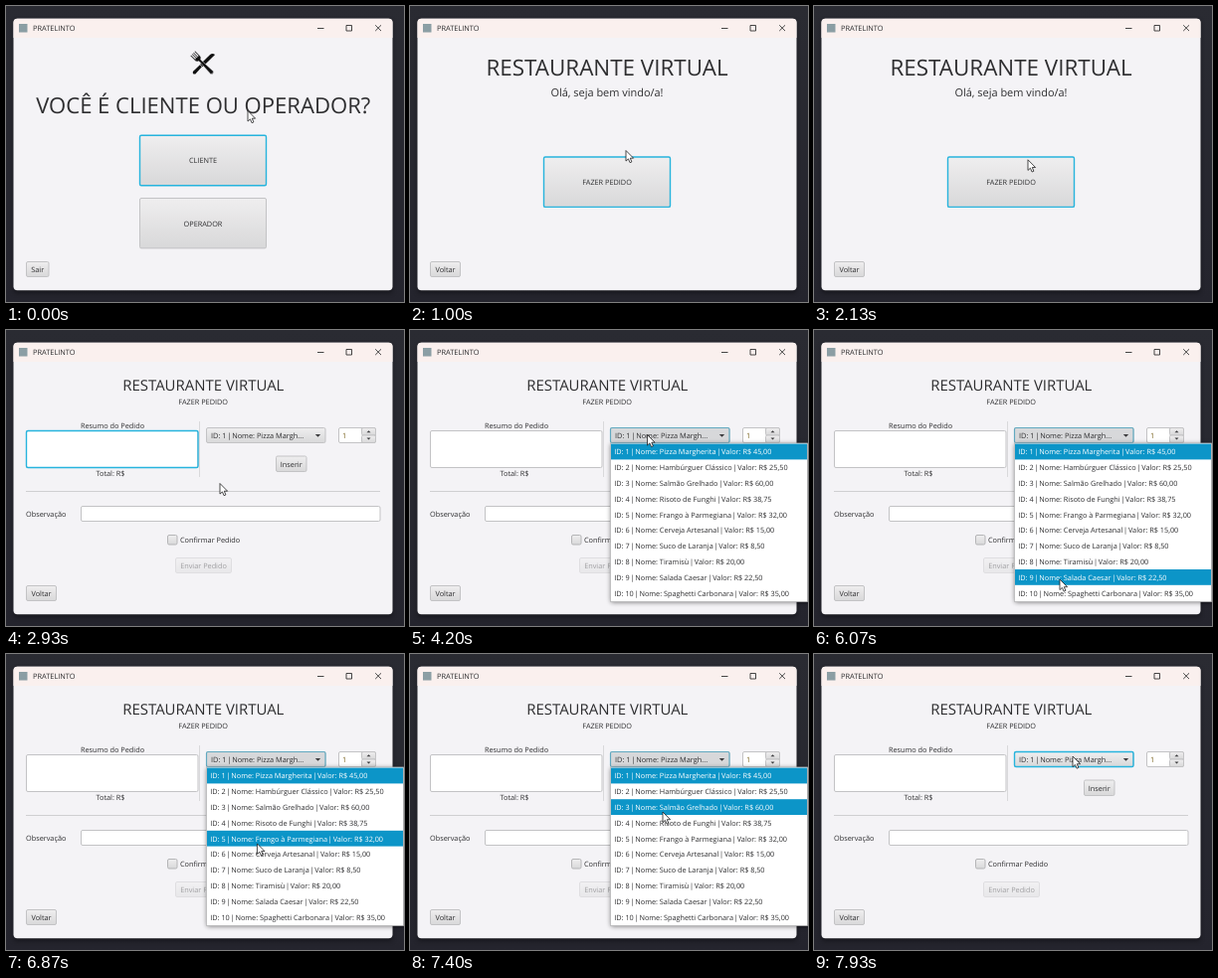
An HTML page that plays this animation: 400 px wide and 298 px high, repeating every 8000 ms.

```html
<!DOCTYPE html>
<html lang="pt-BR">
<head>
<meta charset="utf-8">
<title>Restaurante virtual</title>
<style>
html, body { margin: 0; width: 100%; height: 100%; overflow: hidden; background: #26272e; }
svg { display: block; width: 100vw; height: 100vh; }
text {
  font-family: "Open Sans", "Noto Sans", sans-serif;
  font-size: 7.3px;
  fill: #2e2e30;
  text-rendering: geometricPrecision;
  white-space: pre;
}
</style>
</head>
<body>
<svg id="stage" viewBox="0 0 400 298" xmlns="http://www.w3.org/2000/svg"></svg>
<script>
const LOOP = 8000, TICK = 1000 / 15;
const PAGE2 = 670, PAGE3 = 2200, OPEN = 4000, CLOSE = 7790;
const ROW_H = 15.8, LIST_Y = 114.6;
const FOCUS = '#27b4dd', LINE = '#c3c3c5';

// time, x, y of the pointer tip
const PATH = [
  [0, 243, 105.5], [70, 243, 105.5], [480, 217, 145.5], [1070, 217, 145.5],
  [1600, 215, 155], [2950, 215, 154.5], [3750, 238.5, 105.5], [5470, 238.5, 105.5],
  [6070, 247, 251], [6350, 248, 260], [7130, 254, 166], [7400, 254, 159],
  [7720, 260, 103], [8000, 260, 103]
];

const MENU = [
  ['Pizza Margherita', '45,00'], ['Hambúrguer Clássico', '25,50'],
  ['Salmão Grelhado', '60,00'], ['Risoto de Funghi', '38,75'],
  ['Frango à Parmegiana', '32,00'], ['Cerveja Artesanal', '15,00'],
  ['Suco de Laranja', '8,50'], ['Tiramisù', '20,00'],
  ['Salada Caesar', '22,50'], ['Spaghetti Carbonara', '35,00']
];

const rect = (x, y, w, h, fill, more = '') =>
  `<rect x="${x}" y="${y}" width="${w}" height="${h}" fill="${fill}" ${more}/>`;

const box = (x, y, w, h, fill, line = LINE, weight = 1, r = 1.5) =>
  rect(x + .5, y + .5, w - 1, h - 1, fill, `rx="${r}" stroke="${line}" stroke-width="${weight}"`);

// narrow vertical bars
const bars = s => s.replace(/\| N|\| V/g, m =>
  `<tspan dx="-1.1">|</tspan> <tspan dx="-1.1">${m[2]}</tspan>`);

const text = (s, x, y, size = 7.3, anchor = 'start', fill = '') =>
  `<text x="${x}" y="${y}" style="font-size:${size}px;fill:${fill}" text-anchor="${anchor}">${bars(s)}</text>`;

const mid = (s, x, y, size) => text(s, x, y, size, 'middle');

const button = (s, x, y, w, h, focus) =>
  box(x, y, w, h, 'url(#face)', focus ? FOCUS : LINE, focus ? 1.4 : 1) +
  mid(s, x + w / 2, y + h / 2 + 2.8);

const arrow = (x, y, w, h) =>
  `<path d="M${x - w} ${y}h${2 * w}l${-w} ${h}z" fill="#3a3a3c"/>`;

const group = (id, body) => `<g id="${id}">${body}</g>`;

const cutlery = `
  <g transform="translate(198 58) scale(.88) rotate(45)" fill="#111">
    <path d="M-1.6 3V-13Q-1.4 -16.5 2.4 -17V3Z"/>
    <path d="M-1.4 3.6H1.8L2.2 14.5Q.3 17.5 -1.8 14.5Z"/>
  </g>
  <g transform="translate(198 58) scale(.88) rotate(-45)" fill="#111" stroke="#f4f3f6" stroke-width=".5">
    <path d="M-4 -16.5H-2.7V-10H-1.7V-16.5H-.5V-10H.5V-16.5H1.7V-10H2.7V-16.5H4V-9Q4 -6 1.3 -5.2L2.2 14.5Q0 17.5 -2.2 14.5L-1.3 -5.2Q-4 -6 -4 -9Z"/>
  </g>`;

const frame =
  rect(0, 0, 400, 298, 'url(#desk)') +
  rect(8, 15, 380, 274, '#000', 'opacity=".35" filter="url(#soft)"') +
  rect(7.5, 12.8, 381, 273.4, '#f4f3f6', 'rx="4"') +
  '<path d="M7.5 32V16.8q0 -4 4 -4H384.5q4 0 4 4V32Z" fill="#faf0ee"/>' +
  rect(13, 18, 8.5, 8.5, '#8b9ea4') +
  text('PRATELINTO', 27, 25.2, 7.4) +
  `<path d="M313 22.5h6.5M342 19.5h5.5v5.5h-5.5zM371.2 19.3l5.8 5.8m0 -5.8l-5.8 5.8"
    fill="none" stroke="#333" stroke-width=".9"/>`;

const home = cutlery +
  mid('VOCÊ É CLIENTE OU OPERADOR?', 198.2, 108.4, 22.05) +
  button('CLIENTE', 134, 129.8, 128, 51.4, true) +
  button('OPERADOR', 134, 193, 128, 51.4) +
  button('Sair', 20, 257, 23.5, 16);

const welcome =
  mid('RESTAURANTE VIRTUAL', 198, 69.6, 22.4) +
  mid('Olá, seja bem vindo/a!', 198, 91, 10.95) +
  button('FAZER PEDIDO', 134, 151.5, 128, 51.4, true) +
  button('Voltar', 20, 257, 31, 16);

const order =
  mid('RESTAURANTE VIRTUAL', 198.3, 61.1, 14.95) +
  mid('FAZER PEDIDO', 198.2, 75.2) +
  mid('Resumo do Pedido', 107, 99) +
  box(20, 101, 173.5, 38, '#fff') +
  group('listFocus', box(20, 101, 173.5, 38, 'none', FOCUS, 1.4)) +
  mid('Total: R$', 105, 147.2) +
  rect(194, 92, 1, 56, '#d9d9db') +
  rect(20, 162, 356, 1, '#cfcfd1') +
  box(201, 98, 120.5, 16, 'url(#face)') +
  group('comboFocus', box(201, 98, 120.5, 16, 'none', FOCUS, 1.4)) +
  group('comboDown', box(201, 98, 120.5, 16, '#d7d8da', '#62a9c0', 1.2)) +
  text('ID: 1 | Nome: Pizza Margh...', 206, 108.8, 7.35) +
  arrow(313.5, 105, 2.7, 2.8) +
  box(334, 98, 38, 16, '#fff') +
  box(357, 98, 15, 8.5, 'url(#face)') + box(357, 105.5, 15, 8.5, 'url(#face)') +
  arrow(364.5, 103.2, 2, -2) + arrow(364.5, 108.6, 2, 2) +
  text('1', 338, 108.8, 7.4, 'start', '#7a6420') +
  button('Inserir', 271, 126.5, 31.5, 16.5) +
  text('Observação', 20, 187.5) +
  box(75, 177, 301.5, 16, '#fff') +
  box(162, 206, 10.5, 10.5, 'url(#face)', '#b5b5b7') +
  text('Confirmar Pedido', 175, 213.8) +
  `<g opacity=".42">${button('Enviar Pedido', 170, 229, 57, 16)}</g>` +
  button('Voltar', 20, 257, 31, 16);

const rows = MENU.map(([name, price], i) => {
  const y = LIST_Y + i * ROW_H;
  return `<g class="row">${rect(202, y, 197, ROW_H, '#0c95c8')}` +
    text(`ID: ${i + 1} | Nome: ${name} | Valor: R$ ${price}`, 205.2, y + 10.8) + '</g>';
}).join('');

const popup =
  rect(202, 115, 198, 159, '#000', 'opacity=".55" filter="url(#soft)"') +
  rect(201.5, 114, 198, 159.5, '#fff', 'stroke="#b8b8ba" stroke-width=".8"') + rows;

const pointer = `<path d="M0 0V10.6L2.4 8.4L4.1 12.2L5.9 11.4L4.3 7.7H7.6Z"
  fill="#fff" stroke="#1c1c1e" stroke-width=".8" stroke-linejoin="round"/>`;

const stage = document.getElementById('stage');
stage.innerHTML = `<defs>
  <linearGradient id="face" x2="0" y2="1">
    <stop stop-color="#efeeef"/><stop offset="1" stop-color="#d8d8d9"/>
  </linearGradient>
  <linearGradient id="desk" x2="0" y2="1">
    <stop stop-color="#2a2b32"/><stop offset="1" stop-color="#24242d"/>
  </linearGradient>
  <filter id="soft" x="-10%" y="-10%" width="120%" height="120%"><feGaussianBlur stdDeviation="2.8"/></filter>
</defs>` + frame + group('home', home) + group('welcome', welcome) +
  group('order', order) + group('popup', popup) + group('pointer', pointer);

const el = id => document.getElementById(id);
const show = (node, on) => { node.style.display = on ? '' : 'none'; };
const items = [...stage.querySelectorAll('.row')];

function pointerAt(t) {
  const k = Math.max(1, PATH.findIndex(p => p[0] > t));
  const [t0, x0, y0] = PATH[k - 1], [t1, x1, y1] = PATH[k];
  const u = (t - t0) / (t1 - t0), e = u * u * (3 - 2 * u);
  return [x0 + (x1 - x0) * e, y0 + (y1 - y0) * e];
}

function draw(now) {
  const t = Math.floor((now % LOOP) / TICK + .05) * TICK % LOOP;
  const [x, y] = pointerAt(t);
  const open = t >= OPEN && t < CLOSE;
  show(el('home'), t < PAGE2);
  show(el('welcome'), t >= PAGE2 && t < PAGE3);
  show(el('order'), t >= PAGE3);
  show(el('listFocus'), t < OPEN);
  show(el('comboFocus'), t >= CLOSE);
  show(el('comboDown'), open);
  show(el('popup'), open);
  const hover = Math.floor((y - LIST_Y) / ROW_H);
  items.forEach((item, i) => {
    const on = i === 0 || i === hover;
    show(item.firstChild, on);
    item.lastChild.style.fill = on ? '#fff' : '';
  });
  el('pointer').setAttribute('transform', `translate(${x} ${y})`);
}

const start = performance.now();
function loop() {
  draw(performance.now() - start);
  requestAnimationFrame(loop);
}
loop();
</script>
</body>
</html>
```
